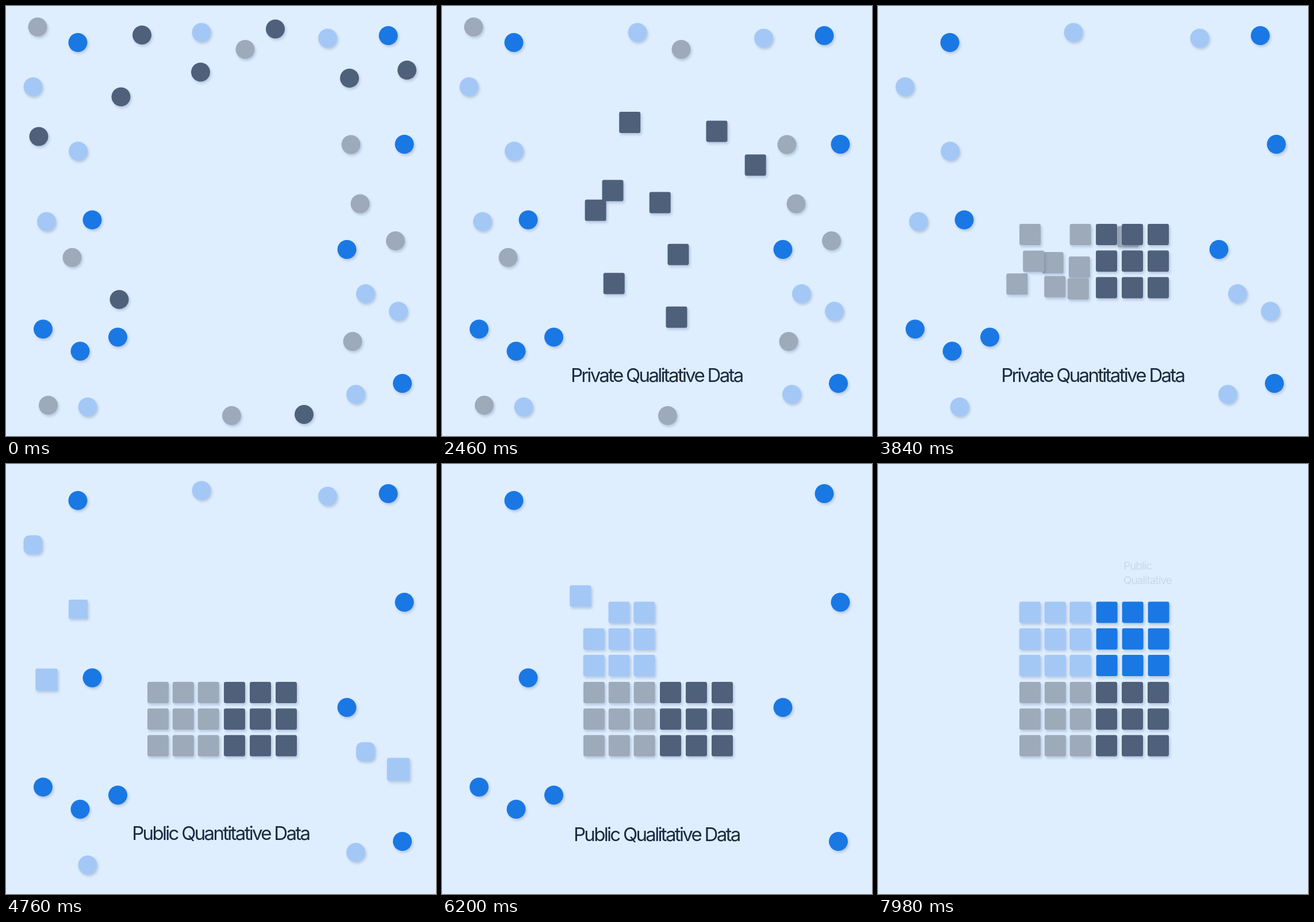
These frames come from a looping animation (748 px wide and 748 px high, 8 s). An HTML page without scripts:

```html
<!DOCTYPE html>
<html lang="en">
<head>
<meta charset="utf-8">
<title>Data quadrants</title>
<style>
/* --t is the loop clock in ms; every pose is computed from it */
@property --t { syntax: "<number>"; inherits: true; initial-value: 0; }
@keyframes clock { from { --t: 0; } to { --t: 8000; } }

html, body { margin: 0; width: 100%; height: 100%; overflow: hidden; background: #deeeff; }
body { animation: clock 8s linear infinite; }
.stage { position: absolute; left: 0; top: 0; width: 748px; height: 748px; overflow: hidden; }

/* quadrants: colour, first slot and column step */
.gray  { --ox: 264;   --oy: 397;   --w: 43.8; color: #9daaba; }
.dark  { --ox: 397;   --oy: 397;   --w: 45;   color: #4f607b; }
.light { --ox: 263.7; --oy: 257.5; --w: 43.8; color: #a4c8f6; }
.blue  { --ox: 397.6; --oy: 257.5; --w: 45;   color: #1a78e4; }

/* dots sit in slot order, three per row */
i { --c: 0; --r: 0; }
i:nth-child(3n+2) { --c: 1; }
i:nth-child(3n) { --c: 2; }
i:nth-child(n+4) { --r: 1; }
i:nth-child(n+7) { --r: 2; }

/* x, y: home; f: take-off; m: start of the morph to a square */
i {
  --m: calc(var(--f) - 440);
  --p: clamp(0, (var(--t) - var(--f)) / 700, 1);
  --s: calc(var(--p) * var(--p) * var(--p) * (4 - 3 * var(--p)));
  --k: calc(1 + (1 - var(--p)) * (2.67 * var(--s) - 1));
  --q: clamp(0, (var(--t) - var(--m)) / 130, 1);
  --u: clamp(0, (var(--t) - var(--m) - 260) / 60, 1);
  --v: clamp(0, (var(--t) - var(--m) - 320) / 80, 1);
  position: absolute;
  left: -16.5px;
  top: -16.5px;
  width: 33px;
  height: 33px;
  background: currentColor;
  border-radius: calc(16.5px - 13.7px * var(--q));
  box-shadow: 2px 3px 4px rgba(60, 75, 115, .24);
  translate:
    calc(1px * (var(--x) + (var(--ox) + var(--c) * var(--w) - var(--x)) * var(--k)))
    calc(1px * (var(--y) + (var(--oy) + var(--r) * 46.2 - var(--y)) * var(--k)));
  scale: calc(1 + .27 * var(--u) - .15 * var(--v));
}
.up { z-index: 1; }
.gray, .dark, .light, .blue { position: absolute; left: 0; top: 0; isolation: isolate; }

svg { position: absolute; left: 0; top: 0; }
text { font-family: Inter, "Noto Sans", sans-serif; fill: #1b2a3f; }

/* a, z: when a caption comes and goes */
.cap {
  --k: calc(1 - clamp(0, (var(--t) - var(--a)) / 400, 1));
  font-size: 33px;
  letter-spacing: -2.7px;
  text-anchor: middle;
  opacity: calc(clamp(0, (var(--t) - var(--a)) / 160, 1) - clamp(0, (var(--t) - var(--z)) / 130, 1));
  transform: translateY(calc(24px * var(--k) * var(--k)));
}
.tag {
  font-size: 19px;
  letter-spacing: -1px;
  opacity: clamp(0, (var(--t) - 7900) / 800, 1);
}
</style>
</head>
<body>
<div class="stage">
  <div class="gray">
    <i style="--x:54.5;--y:36;--f:3140"></i>
    <i style="--x:677;--y:408;--f:3570;--m:3060"></i>
    <i style="--x:73;--y:694;--f:3095"></i>
    <i class="up" style="--x:114.5;--y:437;--f:3448;--m:2720"></i>
    <i style="--x:599.5;--y:240.5;--f:3147"></i>
    <i style="--x:415.5;--y:75;--f:3153"></i>
    <i style="--x:602.5;--y:583;--f:3438"></i>
    <i style="--x:392;--y:712;--f:3144"></i>
    <i style="--x:615.5;--y:343.5;--f:3147"></i>
  </div>
  <div class="dark">
    <i style="--x:518;--y:710;--f:2120"></i>
    <i class="up" style="--x:236;--y:50;--f:2257"></i>
    <i style="--x:468;--y:39.5;--f:2238"></i>
    <i style="--x:338;--y:114.5;--f:2180"></i>
    <i style="--x:196.5;--y:510;--f:2264"></i>
    <i style="--x:597;--y:125;--f:2245"></i>
    <i style="--x:199.5;--y:157.5;--f:2240"></i>
    <i style="--x:697;--y:111;--f:2028"></i>
    <i style="--x:56.5;--y:226.5;--f:2241"></i>
  </div>
  <div class="light">
    <i style="--x:608;--y:675;--f:5530"></i>
    <i class="up" style="--x:125;--y:252;--f:5000"></i>
    <i class="up" style="--x:339.5;--y:45.5;--f:5210"></i>
    <i style="--x:559;--y:55.5;--f:5219"></i>
    <i style="--x:70;--y:374.5;--f:4822"></i>
    <i style="--x:46.5;--y:140;--f:5219;--m:4700"></i>
    <i style="--x:682;--y:530.5;--f:4842"></i>
    <i style="--x:625;--y:500;--f:5142"></i>
    <i style="--x:141.5;--y:697;--f:5415"></i>
  </div>
  <div class="blue">
    <i style="--x:664.5;--y:51;--f:6807"></i>
    <i style="--x:124.5;--y:63;--f:6990"></i>
    <i style="--x:689;--y:656;--f:7100"></i>
    <i style="--x:692.5;--y:240;--f:7000"></i>
    <i style="--x:64;--y:561.5;--f:6807"></i>
    <i style="--x:592.5;--y:423;--f:7010"></i>
    <i style="--x:194;--y:575.5;--f:7060"></i>
    <i style="--x:128.5;--y:600;--f:6903"></i>
    <i style="--x:149.5;--y:371.5;--f:7055"></i>
  </div>
  <svg width="748" height="748" viewBox="0 0 748 748">
    <text class="cap" x="373.3" y="654" style="--a:1000;--z:2640">Private Qualitative Data</text>
    <text class="cap" x="373.3" y="654" style="--a:2770;--z:4050">Private Quantitative Data</text>
    <text class="cap" x="373.3" y="654" style="--a:4180;--z:5780">Public Quantitative Data</text>
    <text class="cap" x="373.3" y="654" style="--a:5920;--z:7600">Public Qualitative Data</text>
    <text class="tag" x="427" y="184">Public<tspan x="427" y="208.5">Qualitative</tspan></text>
  </svg>
</div>
</body>
</html>
```
